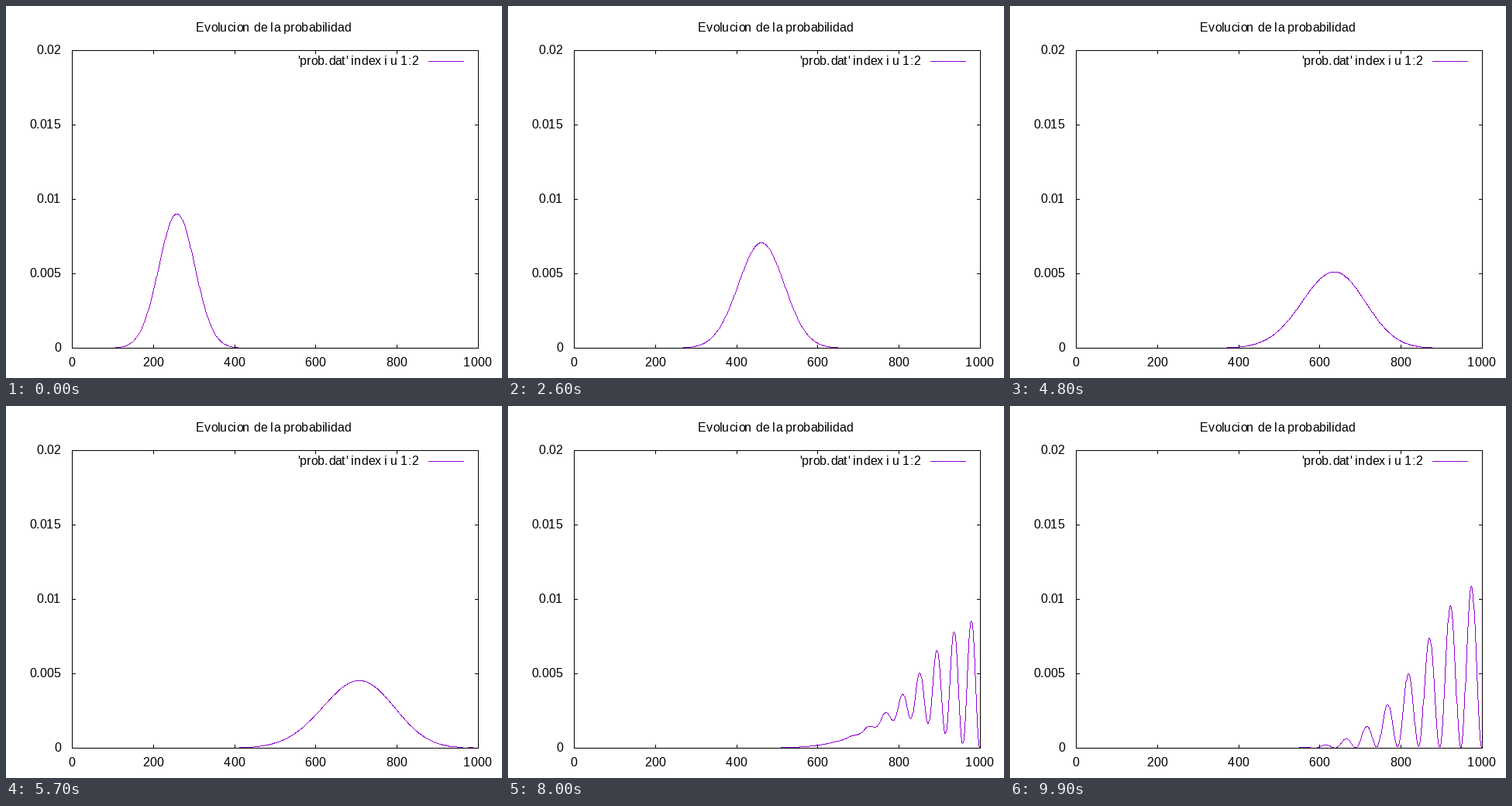
A matplotlib script that plays this animation: 640x480 px, repeating every 10000 ms.

```python
import math

import numpy as np
import matplotlib.pyplot as plt
from matplotlib.animation import FuncAnimation
from matplotlib.textpath import TextPath

W, H, DPI = 640, 480, 80
LEFT, RIGHT, TOP, BOTTOM = 85, 609, 57, 441
FRAMES, INTERVAL = 100, 100
X_MAX, Y_MAX = 1000, 0.02
PX = 72 / DPI  # one pixel in points
FONT_PX = 16
TICK = 4
VIOLET = (0x94, 0x00, 0xD3, 255)

plt.rcParams["font.family"] = "Liberation Sans"


def wave_packet(n, cycles=10):
    """Probability density per step for a packet in a box (Cayley scheme).

    The grid has n points; the wave is zero at the first and the last.
    """
    j = np.arange(1, n - 1)
    k0 = 2 * np.pi * cycles / n
    dt = 1 / (4 * k0 ** 2)
    psi = np.exp(1j * k0 * j - 8 * (4 * j - n) ** 2 / n ** 2)
    psi /= np.sqrt(np.sum(np.abs(psi) ** 2))

    wall = n - 1
    modes = np.sin(np.pi * np.outer(j, j) / wall) * np.sqrt(2 / wall)
    energy = 2 - 2 * np.cos(np.pi * j / wall)
    step = (1 - 0.5j * dt * energy) / (1 + 0.5j * dt * energy)
    steps = np.arange(1, FRAMES + 1)
    states = modes @ ((modes @ psi)[:, None] * step[:, None] ** steps)
    return np.pad(np.abs(states.T) ** 2, ((0, 0), (1, 1)))


def to_px(x, y):
    col = LEFT + np.floor(x / X_MAX * (RIGHT - LEFT) + 0.5)
    row = BOTTOM - np.floor(y / Y_MAX * (BOTTOM - TOP) + 0.5)
    return col.astype(int), row.astype(int)


def raster(x, y):
    """Draw a hard-edged polyline, one pixel wide, on a clear canvas."""
    col, row = to_px(x, y)
    dc, dr = np.diff(col), np.diff(row)
    length = np.maximum(np.maximum(abs(dc), abs(dr)), 1)
    f = np.minimum(np.arange(length.max() + 1)[:, None] / length, 1)
    c = col[:-1] + dc * f
    # a tie goes to the column of the lower end
    cols = np.where(dr < 0, np.ceil(c - 0.5), np.floor(c + 0.5)).astype(int)
    rows = np.floor(row[:-1] + dr * f + 0.5).astype(int)
    canvas = np.zeros((H, W, 4), np.uint8)
    canvas[rows, cols] = VIOLET
    return canvas


def text_width(s):
    return TextPath((0, 0), s, size=FONT_PX).get_extents().width


def advance(ch):
    return text_width(f"|{ch}|") - text_width("||")


def label(x, y, s, align):
    """Set text glyph by glyph on whole pixels; align 0.5 centre, 1 right."""
    widths = [advance(ch) for ch in s]
    pen = math.floor(x - align * (sum(widths) + 1))
    for ch, w in zip(s, widths):
        if ch != " ":
            ax.text(round(pen), y, ch, fontsize=FONT_PX * PX, va="baseline",
                    zorder=4)
        pen += w


def line(x0, y0, x1, y1, color="black"):
    ax.plot([x0 + 0.5, x1 + 0.5], [y0 + 0.5, y1 + 0.5], color=color, lw=PX,
            solid_capstyle="projecting", antialiased=False, snap=False,
            zorder=3)


fig = plt.figure(figsize=(W / DPI, H / DPI), dpi=DPI, facecolor="white")
ax = fig.add_axes([0, 0, 1, 1])
density = wave_packet(X_MAX)
xs = np.arange(X_MAX)
curve = ax.imshow(raster(xs, density[0]), extent=(0, W, H, 0),
                  interpolation="nearest", aspect="auto", zorder=2)
ax.set_xlim(0, W)
ax.set_ylim(H, 0)
ax.axis("off")

for y in (TOP, BOTTOM):
    line(LEFT, y, RIGHT, y)
for x in (LEFT, RIGHT):
    line(x, TOP, x, BOTTOM)

for i in range(6):
    value = i * 200
    x = int(to_px(np.array(value), np.array(0))[0])
    line(x, BOTTOM, x, BOTTOM - TICK)
    line(x, TOP, x, TOP + TICK)
    label(x, 465, str(value), 0.5)
for i in range(5):
    value = i * 0.005
    y = BOTTOM - i * (BOTTOM - TOP) // 4
    line(LEFT, y, LEFT + TICK, y)
    line(RIGHT, y, RIGHT - TICK, y)
    label(72, y + 5, f"{value:g}", 1)

label(346, 33, "Evolucion de la probabilidad", 0.5)
label(533, 76, "'prob.dat' index i u 1:2", 1)
line(545, 71, 590, 71, "#9400D3")


def update(n):
    curve.set_data(raster(xs, density[n]))
    return (curve,)


anim = FuncAnimation(fig, update, frames=FRAMES, interval=INTERVAL,
                     repeat=True, repeat_delay=0, blit=False)
plt.show()
```
